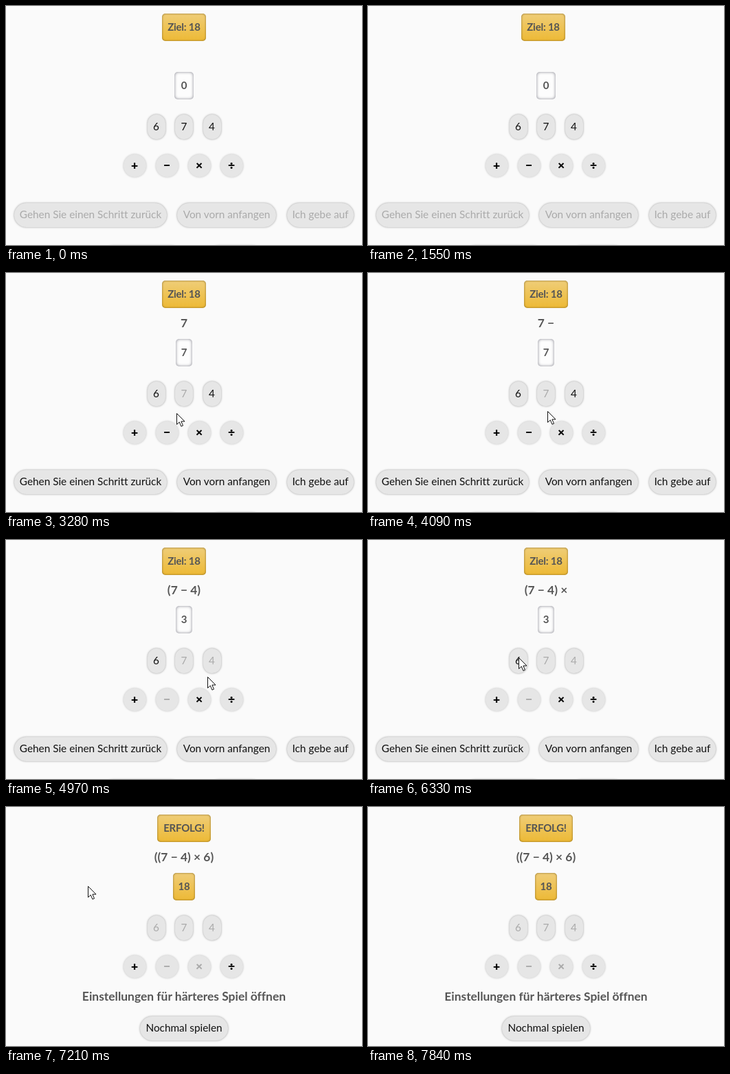
Animation of 518 by 348 pixels, one loop 8.7 s. Source, as an HTML page:

```html
<!DOCTYPE html>
<html lang="de">
<head>
<meta charset="utf-8">
<title>Zahlenspiel</title>
<style>
html, body { margin: 0; width: 100%; height: 100%; overflow: hidden; background: #fafafa; }
#stage { position: relative; width: 518px; height: 348px; overflow: hidden; font-family: Lato, "Open Sans", sans-serif; font-variant-ligatures: none; }
#stage > * { position: absolute; box-sizing: border-box; text-align: center; white-space: nowrap; }
.badge { height: 40px; line-height: 38px; border-radius: 5px; font-size: 15px; font-weight: bold; letter-spacing: -.25px; color: #555; }
.gold { background: linear-gradient(#efcd78, #edb935); box-shadow: inset 0 0 3px #80621c; }
.white { background: #fdfdfd; box-shadow: inset 0 0 4px #85858f; }
.btn { background: #e6e6e6; border-radius: 19px; font-size: 15.35px; color: #111; box-shadow: 0 0 3px #999; }
.op { font-weight: 900; font-size: 17.5px; color: #000; box-shadow: 0 0 3px #bbb; }
.off { color: #aaa; }
.line { left: 0; width: 518px; font-size: 17.4px; font-weight: bold; color: #555; height: 24px; line-height: 22px; }
</style>
</head>
<body>
<div id="stage"></div>
<script>
const LOOP = 8700;
const stage = document.getElementById('stage');

function add(cls, text, x, y, w, h) {
  const el = document.createElement('div');
  el.className = cls;
  el.textContent = text;
  if (w) Object.assign(el.style, {
    left: x + 'px', top: y + 'px', width: w + 'px', height: h + 'px', lineHeight: h - 2 + 'px'
  });
  stage.append(el);
  return el;
}

const goal = add('badge gold', '', 227, 11, 64, 40);
const expr = add('line', '');
expr.style.top = '62px';
const result = add('badge white', '', 245, 96, 28, 40);
const nums = ['6', '7', '4'].map((s, i) => add('btn', s, 205.5 + 40.5 * i, 158, 26, 36));
const ops = ['+', '−', '×', '÷'].map((s, i) => add('btn op', s, 170.5 + 47 * i, 216, 33, 33));
const tools = [
  add('btn', 'Gehen Sie einen Schritt zurück', 12, 287, 222, 35),
  add('btn', 'Von vorn anfangen', 249, 287, 144, 35),
  add('btn', 'Ich gebe auf', 409, 287, 97, 35)
];
const below = [add('btn', '', 139, 349, 118, 35), add('btn', '', 293, 349, 82, 35)];
const harder = add('line', 'Einstellungen für härteres Spiel öffnen');
harder.style.top = '265px';
const again = add('btn', 'Nochmal spielen', 195, 305, 128, 35);

stage.insertAdjacentHTML('beforeend',
  `<svg width="14" height="21" viewBox="-.5 -.5 14 21" style="left:0;top:0">
    <path d="M0 0V16L3.8 12.6L6.4 18.8L9 17.7L6.4 11.6H11.5Z" fill="#fff" stroke="#111"/></svg>`);
const cursor = stage.lastElementChild;

// start, expression, result, result width, disabled numbers, disabled operators
const moves = [
  [0, '', '0', 28, '', ''],
  [3000, '7', '7', 24, '7', ''],
  [3760, '7 −', '7', 24, '7', ''],
  [4700, '(7 − 4)', '3', 24, '74', '−'],
  [5660, '(7 − 4) ×', '3', 24, '74', '−'],
  [6530, '((7 − 4) × 6)', '18', 32, '674', '−×']
];

// time and tip position of the pointer
const path = [
  [2250, 530, 125], [2450, 400, 140], [2810, 255, 170],
  [2880, 254, 171], [3060, 254, 171], [3280, 248, 204],
  [3630, 229, 234], [3790, 229, 234], [4100, 262, 200],
  [4360, 292, 170], [4500, 292, 170], [4570, 294, 171],
  [4740, 294, 171], [4970, 293, 199], [5520, 276, 233],
  [5700, 276, 233], [6000, 246, 200], [6330, 219, 171],
  [6560, 219, 171], [7210, 119, 115], [7360, 113, 98],
  [7560, 122, 150], [7840, 150, 350]
];

function slope(i, k) {
  const a = path[i - 1], b = path[i], c = path[i + 1];
  if (!a || !c) return 0;
  const rests = p => p[1] === b[1] && p[2] === b[2];
  return rests(a) || rests(c) ? 0 : (c[k] - a[k]) / (c[0] - a[0]);
}

function tip(t, k) {
  const i = path.findLastIndex(p => p[0] <= t);
  const a = path[i], b = path[i + 1], d = b[0] - a[0], u = (t - a[0]) / d;
  const s = u * u * (3 - 2 * u);
  return a[k] + (b[k] - a[k]) * s
    + d * (slope(i, k) * u * (1 - u) ** 2 - slope(i + 1, k) * u * u * (1 - u));
}

// CSS "ease" curve
function ease(x) {
  let lo = 0, hi = 1, m = 0;
  for (let n = 0; n < 14; n++) {
    m = (lo + hi) / 2;
    const bx = .75 * m * (1 - m) * (1 - m) + .75 * m * m * (1 - m) + m ** 3;
    if (bx < x) lo = m; else hi = m;
  }
  return .3 * m * (1 - m) * (1 - m) + 3 * m * m * (1 - m) + m ** 3;
}

function shake(p) {
  if (p <= 0 || p >= 1) return 0;
  const at = i => i % 10 ? (i % 2 ? -4 : 4) : 0;
  const i = Math.floor(p * 10);
  return at(i) + (at(i + 1) - at(i)) * ease(p * 10 - i);
}

function pulse(p) {
  if (p <= 0 || p >= 1) return 1;
  return 1 + .05 * (p < .5 ? ease(p * 2) : 1 - ease(p * 2 - 1));
}

const show = (el, on) => { el.style.visibility = on ? 'visible' : 'hidden'; };
const box = (el, w) => { el.style.left = 259 - w / 2 + 'px'; el.style.width = w + 'px'; };
let last;

function setMove(move) {
  const [, text, value, width, usedNums, usedOps] = move;
  const idle = move === moves[0], won = move === moves[5];
  goal.textContent = won ? 'ERFOLG!' : 'Ziel: 18';
  box(goal, won ? 78 : 64);
  expr.textContent = text;
  result.textContent = value;
  result.className = 'badge ' + (won ? 'gold' : 'white');
  box(result, width);
  nums.forEach(el => el.classList.toggle('off', usedNums.includes(el.textContent)));
  ops.forEach(el => el.classList.toggle('off', usedOps.includes(el.textContent)));
  tools.forEach(el => { el.classList.toggle('off', idle); show(el, !won); });
  below.forEach(el => show(el, !won));
  [harder, again].forEach(el => show(el, won));
}

function draw(t) {
  const move = moves.findLast(m => m[0] <= t);
  if (move !== last) setMove(last = move);
  goal.style.transform = `translateX(${shake((t - 1060) / 980)}px)`;
  harder.style.transform = `scale(${pulse((t - 6530) / 800)})`;
  const seen = t >= path[0][0] && t < path.at(-1)[0];
  show(cursor, seen);
  if (seen) cursor.style.transform = `translate(${Math.round(tip(t, 1))}px, ${Math.round(tip(t, 2))}px)`;
}

const start = performance.now();
function tick() {
  draw((performance.now() - start) % LOOP);
  requestAnimationFrame(tick);
}
tick();
</script>
</body>
</html>
```
